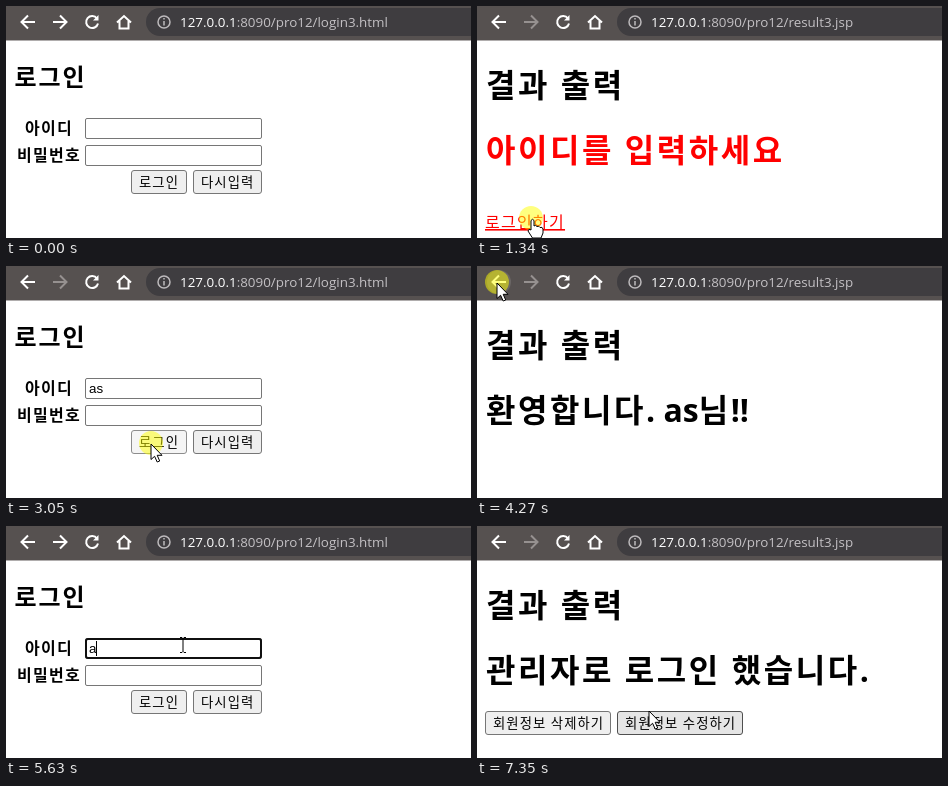
An HTML page that plays this animation: 465 px wide and 232 px high, repeating every 8.08 s.

```html
<!DOCTYPE html>
<html lang="ko">
<meta charset="utf-8">
<style>
  html, body { margin: 0; width: 100%; height: 100%; overflow: hidden; background: #fff; }
  svg { display: block; font-family: "Open Sans", "Noto Sans CJK KR", sans-serif; }
  .ko text { letter-spacing: .08em; }
  .ko .latin { letter-spacing: 0; }
  .h1 { font-size: 32px; font-weight: 700; }
  .label { font-size: 16px; font-weight: 700; }
  .btn text { font-size: 13.33px; font-weight: 350; }
  .btn rect { fill: #efefef; stroke: #767676; }
  .btn.hover rect { fill: #e5e5e5; stroke: #4f4f4f; }
  .btn.pressed rect { fill: #f5f5f5; stroke: #8d8d8d; }
  .field { fill: #fff; stroke: #767676; }
  .icon { fill: none; stroke: #fff; stroke-width: 2; }
  #link { font-size: 16px; font-weight: 350; fill: #551a8b; text-decoration: underline; }
  #value { font: 13.33px "Liberation Sans", Arial, sans-serif; }
</style>
<svg width="465" height="232" viewBox="0 0 465 232">
  <rect width="465" height="35" fill="#b0adad"/>
  <rect width="465" height="34" fill="#565150"/>
  <circle id="backHover" cx="22" cy="16" r="12" fill="#6b6665"/>
  <g class="icon">
    <path d="M29 16H16M22 9.5L15.5 16L22 22.5"/>
    <path id="forward" d="M47 16H60M54 9.5L60.5 16L54 22.5"/>
    <path d="M91 12.5A6 6 0 1 0 92 17.5"/>
    <path d="M92.5 9V14.5H87Z" fill="#fff" stroke="none"/>
    <path d="M111 16.5L118 10L125 16.5M113.5 15V22.5H122.5V15"/>
  </g>
  <rect x="140" y="2" width="360" height="28" rx="14" fill="#3f3d40"/>
  <g fill="none" stroke="#bdbabc" stroke-width="1.5">
    <circle cx="158" cy="16" r="6"/><path d="M158 15V19.5M158 12V13.5"/>
  </g>
  <text x="174" y="21" font-size="13.4" fill="#c4c1c4"><tspan fill="#fff">127.0.0.1</tspan>:8090/pro12/<tspan id="file"></tspan></text>

  <g class="ko">
    <g id="login">
      <text x="8.5" y="80" font-size="24" font-weight="700">로그인</text>
      <text class="label" x="19" y="128">아이디</text>
      <text class="label" x="11" y="155">비밀번호</text>
      <rect class="field" x="79.5" y="112.5" width="176" height="20" rx="1.5"/>
      <rect class="field" x="79.5" y="139.5" width="176" height="20" rx="1.5"/>
      <rect id="ring" x="80" width="175" height="19" rx="2" fill="none" stroke="#101010" stroke-width="2"/>
      <rect id="selection" x="83" y="115" width="14" height="15" fill="#0078d7"/>
      <text id="value" class="latin" x="83" y="127"></text>
      <circle id="dot" cx="85.5" cy="150" r="2.3"/>
      <rect id="caret" width="1" height="15"/>
      <g class="btn"><rect x="125.5" y="164.5" width="55" height="23" rx="2.5"/><text x="133" y="181">로그인</text></g>
      <g class="btn"><rect x="187.5" y="164.5" width="68" height="23" rx="2.5"/><text x="195" y="181">다시입력</text></g>
    </g>

    <text id="result" class="h1" x="9" y="91">결과 출력</text>
    <g id="empty">
      <text class="h1" x="9" y="156" fill="red">아이디를 입력하세요</text>
      <text id="link" x="8" y="222">로그인하기</text>
    </g>
    <g id="welcome">
      <text class="h1" x="9" y="156">환영합니다<tspan class="latin">. as</tspan>님<tspan class="latin">!!</tspan></text>
    </g>
    <g id="admin">
      <text class="h1" x="9" y="156">관리자로 로그인 했습니다.</text>
      <g class="btn"><rect x="8.5" y="185.5" width="125" height="23" rx="2.5"/><text x="16" y="202">회원정보 삭제하기</text></g>
      <g class="btn"><rect x="140.5" y="185.5" width="125" height="23" rx="2.5"/><text x="148" y="202">회원정보 수정하기</text></g>
    </g>
  </g>

  <g id="pointer">
    <circle id="click" cx="0" cy="-1" r="12" fill="#ff0" fill-opacity=".5"/>
    <path id="arrow" d="M0 0V15.5L3.6 12.3L6.2 18L8.7 17L6.2 11.3H11Z" fill="#fff" stroke="#000"/>
    <path id="beam" d="M-3 -7.5H-1L0 -6.5L1 -7.5H3M0 -6.5V6.5M-3 7.5H-1L0 6.5L1 7.5H3" fill="none" stroke="#000"/>
    <path id="hand" d="M0 11V1.5Q1.5 -1 3 1.5V7Q4.5 5.5 6 7.5Q8 6.5 9 8.5Q11.5 7.5 12 10V14L10 19H1.5L-3 12Q-2.5 9 0 11Z" fill="#fff" stroke="#000"/>
  </g>
</svg>
<script>
const LOOP = 8080, STEP = 67;
const $ = id => document.getElementById(id);
const show = (id, on) => $(id).style.display = on ? '' : 'none';

// [start, value]
const pages = [[0, 'login'], [610, 'empty'], [1480, 'login'], [3130, 'welcome'], [4400, 'login'], [7350, 'admin']];
const typing = [[0, ''], [2290, 'a'], [2500, 'as'], [5630, 'a'], [5830, 'ad'], [5920, 'adm'], [6020, 'admi'], [6100, 'admin']];
const focuses = [[0, ''], [1890, 'id'], [2980, ''], [4820, 'id'], [6220, 'pw'], [7210, '']];
// [start, end]
const presses = [[480, 610], [1340, 1480], [1890, 2020], [2980, 3130], [4270, 4400], [4820, 4890], [4960, 5030], [7210, 7350]];
// [start, end, x, y]
const moves = [[0, 0, 218, 199], [70, 280, 137, 181], [1010, 1140, 54, 213], [1500, 1820, 117, 129],
  [2640, 2950, 145, 178], [3860, 4220, 20, 17], [4420, 4740, 177, 119], [6880, 7010, 172, 185]];

const at = (list, t) => list.filter(([start]) => start <= t).pop()[1];
const within = (t, a, b) => t >= a && t < b;
const inside = (x, y, left, top, w, h) => x >= left && x <= left + w && y >= top && y <= top + h;

function pointerAt(t) {
  let x = 0, y = 0;
  for (const [start, end, toX, toY] of moves) {
    if (t < start) break;
    const p = end > start ? Math.min(1, (t - start) / (end - start)) : 1;
    const ease = p * p * (3 - 2 * p);
    x += (toX - x) * ease;
    y += (toY - y) * ease;
  }
  return [Math.round(x), Math.round(y)];
}

function draw(t) {
  const page = at(pages, t), text = at(typing, t), focus = at(focuses, t);
  const pressed = presses.some(([a, b]) => within(t, a, b));
  const [x, y] = pointerAt(Math.floor(t / STEP + .1) * STEP);
  const login = page === 'login';

  for (const id of ['login', 'empty', 'welcome', 'admin']) show(id, id === page);
  show('result', !login);
  $('file').textContent = login ? 'login3.html' : 'result3.jsp';
  $('forward').style.stroke = t < 610 || within(t, 4400, 7350) ? '#fff' : '#969190';
  show('backHover', Math.hypot(x - 22, y - 16) < 12);

  const selected = within(t, 4960, 5630);
  const top = focus === 'pw' ? 140 : 113;
  const dotted = t >= 6480;
  $('value').textContent = text;
  $('value').style.fill = selected ? '#fff' : '#000';
  show('selection', selected);
  show('dot', dotted);
  show('ring', focus);
  show('caret', focus && !selected);
  $('ring').setAttribute('y', top);
  $('caret').setAttribute('y', top + 2);
  const advance = focus === 'pw' ? (dotted ? 5 : 0) : login && text ? $('value').getComputedTextLength() : 0;
  $('caret').setAttribute('x', Math.round(83 + advance));

  for (const btn of document.querySelectorAll('.btn')) {
    const [left, upper, w, h] = ['x', 'y', 'width', 'height'].map(k => +btn.firstChild.getAttribute(k));
    const over = t >= 70 && inside(x, y, left - .5, upper - .5, w + 1, h + 1);
    btn.classList.toggle('hover', over && !pressed);
    btn.classList.toggle('pressed', over && pressed);
  }

  const overField = login && (inside(x, y, 79, 112, 177, 21) || inside(x, y, 79, 139, 177, 21));
  const overLink = page === 'empty' && inside(x, y, 8, 206, 80, 20);
  $('link').style.fill = overLink && pressed ? 'red' : '';
  show('pointer', t >= 70);
  show('click', pressed);
  show('beam', overField);
  show('hand', overLink);
  show('arrow', !overField && !overLink);
  $('pointer').setAttribute('transform', `translate(${x} ${y})`);
}

function tick() {
  draw(performance.now() % LOOP);
  requestAnimationFrame(tick);
}
tick();
</script>
</html>
```
